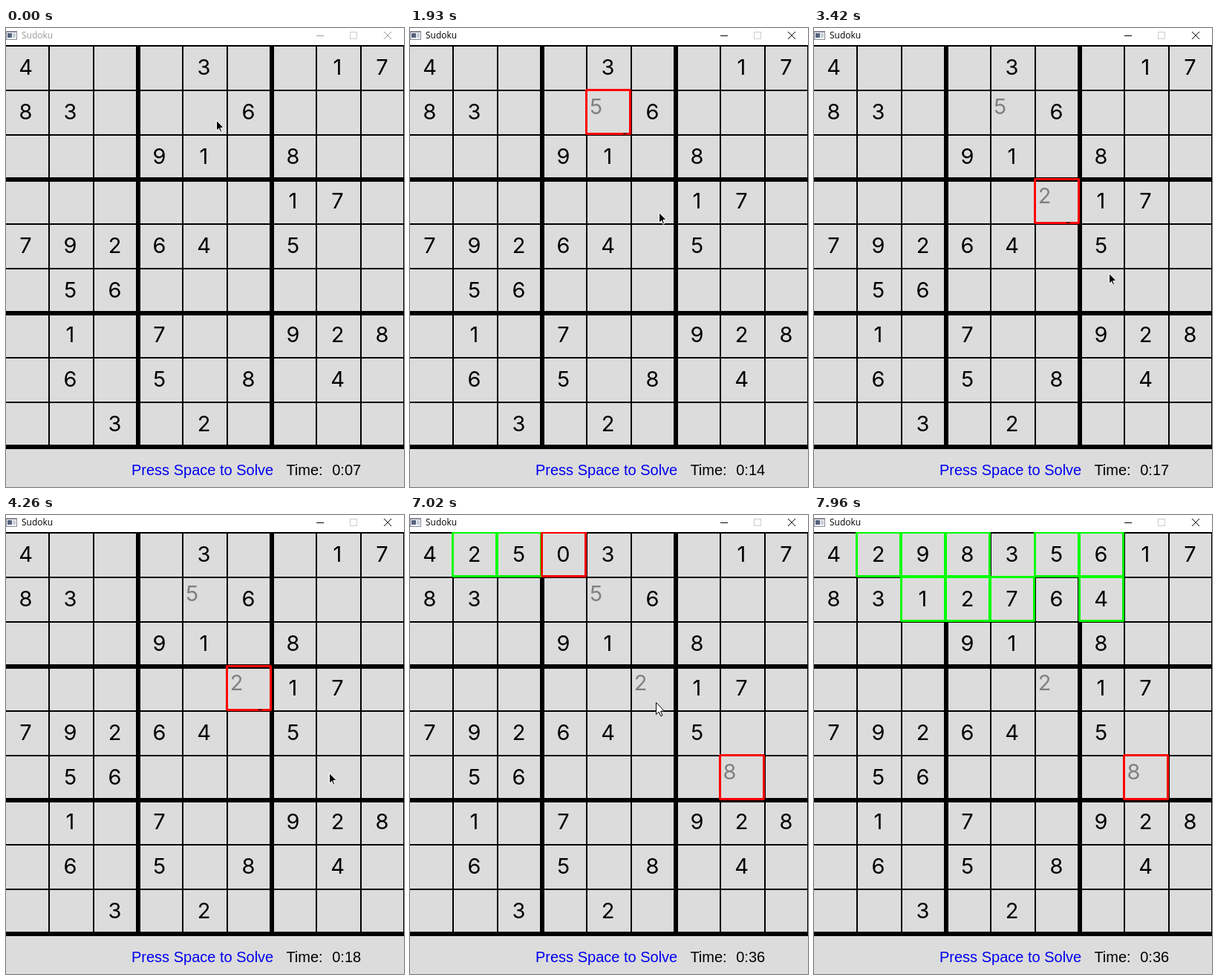
Animation, 536 px wide and 618 px high, one loop 8000 ms. Source, as an HTML page with a canvas:

```html
<!DOCTYPE html>
<html lang="en">
<head>
<meta charset="utf-8">
<title>Sudoku</title>
<style>
html, body { margin: 0; width: 100%; height: 100%; overflow: hidden; background: #dcdcdc; }
canvas { display: block; }
</style>
</head>
<body>
<canvas id="stage" width="536" height="618"></canvas>
<script>
const ctx = document.getElementById('stage').getContext('2d');
const LOOP = 8000, TICK = 78, CELL = 60, LEFT = -3, TOP = 23;
const SOLVE_START = 6710, SOLVE_STEP = 103;
const DIGIT_FONT = '29px Inter, "Liberation Sans", sans-serif';
const LABEL_FONT = '20px "Liberation Sans", Arial, sans-serif';
const TITLE_FONT = '12px "Open Sans", "Noto Sans", sans-serif';
const BACK = '#dcdcdc', RED = '#f00', GREEN = '#0f0';

const puzzle = [
  '4...3..17',
  '83...6...',
  '...91.8..',
  '......17.',
  '79264.5..',
  '.56......',
  '.1.7..928',
  '.6.5.8.4.',
  '..3.2....'
].map(line => [...line].map(char => Number(char) || 0));

// Cells picked by the player, with the notes typed as [time, digit].
const picks = [
  { at: 230, row: 1, col: 4, notes: [[930, 5]] },
  { at: 2090, row: 3, col: 5, notes: [[2720, 2]] },
  { at: 4660, row: 5, col: 7, notes: [[5270, 4], [5750, 8]] }
];

// Pointer moves: each runs from the end of the one before.
const moves = [
  { start: 0, end: 160, x: 282, y: 128 },
  { start: 1490, end: 1930, x: 335, y: 248 },
  { start: 2872, end: 3730, x: 407, y: 342 },
  { start: 3730, end: 4260, x: 435, y: 347 },
  { start: 4352, end: 4580, x: 437, y: 374 }
];

const cellX = col => LEFT + col * CELL;
const cellY = row => TOP + row * CELL;
const mix = (a, b, p) => a + (b - a) * p;
const easeOut = p => 1 - (1 - p) ** 2;
const latest = (list, t) => list.filter(([at]) => at <= t).pop();

// Progress from 0 to 1 in discrete ticks.
function progress(start, end, t) {
  const ticks = Math.round((end - start) / TICK);
  const part = Math.min(1, Math.max(0, (t - start) / (end - start)));
  return Math.floor(part * ticks) / ticks;
}

function fits(board, row, col, digit) {
  for (let i = 0; i < 9; i++) {
    const boxRow = row - row % 3 + Math.floor(i / 3);
    const boxCol = col - col % 3 + i % 3;
    if ([board[row][i], board[i][col], board[boxRow][boxCol]].includes(digit)) return false;
  }
  return true;
}

// Backtracking that reports every digit set and every cell cleared.
function* solve(board) {
  const row = board.findIndex(line => line.includes(0));
  if (row < 0) return true;
  const col = board[row].indexOf(0);
  for (let digit = 1; digit <= 9; digit++) {
    if (!fits(board, row, col, digit)) continue;
    board[row][col] = digit;
    yield { row, col, digit };
    if (yield* solve(board)) return true;
    board[row][col] = 0;
    yield { row, col, digit: 0 };
  }
  return false;
}

const solver = solve(puzzle.map(line => [...line]));
const steps = Array.from(
  { length: Math.ceil((LOOP - SOLVE_START) / SOLVE_STEP) },
  () => solver.next().value
);

// The clock runs unevenly, then skips ahead while the window is inactive.
function secondsAt(t) {
  const keys = [[0, 7.6], [480, 11.2], [1930, 14.1], [4890, 20], [5580, 23.1]];
  const skip = t >= 6310 ? 13 : 0;
  const next = keys.findIndex(([at]) => at > t);
  if (next < 0) return 23 + skip;
  const [t0, s0] = keys[next - 1], [t1, s1] = keys[next];
  return Math.floor(mix(s0, s1, (t - t0) / (t1 - t0)));
}

function pointerAt(t) {
  let x = 283, y = 124;
  for (const move of moves) {
    const p = easeOut(progress(move.start, move.end, t));
    x = mix(x, move.x, p);
    y = mix(y, move.y, p);
  }
  return [Math.round(x), Math.round(y)];
}

function fill(color, x, y, w, h) {
  ctx.fillStyle = color;
  ctx.fillRect(x, y, w, h);
}

function write(text, x, y, font, color, align = 'left') {
  ctx.font = font;
  ctx.fillStyle = color;
  ctx.textAlign = align;
  ctx.fillText(text, x, y);
}

function drawTitleBar(active) {
  const ink = active ? '#000' : '#999';
  fill('#fff', 0, 0, 536, TOP);
  fill('#868b96', 0, 4, 15, 12);
  fill('#f4f6fa', 1, 6, 13, 9);
  fill('#56637d', 2, 7, 6, 6);
  fill('#c8ced8', 9, 7, 4, 6);
  write('Sudoku', 21, 14, TITLE_FONT, ink);
  fill(ink, 418, 10, 10, 1);
  ctx.lineWidth = 1;
  ctx.strokeStyle = '#ccc';
  ctx.strokeRect(463.5, 5.5, 9, 9);
  ctx.strokeStyle = ink;
  ctx.beginPath();
  ctx.moveTo(509, 5);
  ctx.lineTo(519, 15);
  ctx.moveTo(519, 5);
  ctx.lineTo(509, 15);
  ctx.stroke();
}

function drawGrid() {
  for (let i = 0; i <= 9; i++) {
    const thick = i > 0 && i % 3 === 0;
    const width = thick ? 6 : 2, shift = thick ? 2 : 0;
    fill('#000', 0, cellY(i) - shift, 537, width);
    fill('#000', cellX(i) - shift, TOP, width, 9 * CELL);
  }
}

function drawDigit(digit, row, col) {
  write(digit, cellX(col) + 29.5, cellY(row) + 40, DIGIT_FONT, '#000', 'center');
}

function drawNote(digit, row, col) {
  write(digit, cellX(col) + 13.5, cellY(row) + 33, DIGIT_FONT, '#808080', 'center');
}

// Four bars that leave the outermost corner pixels open.
function drawFrame(row, col, color) {
  const x = cellX(col), y = cellY(row);
  for (const side of [-1, CELL - 2]) {
    fill(color, x + side, y, 3, CELL);
    fill(color, x, y + side, CELL, 3);
  }
}

function drawPicks(t) {
  const made = picks.filter(pick => pick.at <= t);
  for (const { row, col, notes } of made) {
    const note = latest(notes, t);
    if (note) drawNote(note[1], row, col);
  }
  if (!made.length) return;
  const { at, row, col } = made.pop();
  drawFrame(row, col, RED);
  // the pointer leaves a dark trace on the frame
  const [x, y] = pointerAt(at);
  const room = cellY(row + 1) - y - 12;
  fill('#700000', x + 5, y + 13, 5, Math.max(0, Math.min(2, room)));
}

function drawStep({ row, col, digit }) {
  fill(BACK, cellX(col), cellY(row), CELL, CELL);
  drawDigit(digit, row, col);
  drawFrame(row, col, digit ? GREEN : RED);
}

function drawFooter(t) {
  const seconds = String(secondsAt(t)).padStart(2, '0');
  write('Press Space to Solve', 169, 602, LABEL_FONT, '#0000f0');
  write('Time:', 377.4, 602, LABEL_FONT, '#000');
  write('0:' + seconds, 439.2, 602, LABEL_FONT, '#000');
}

function drawArrow([x, y], scale, color, outline) {
  const corners = [[0, 0], [0, 16], [3.7, 12.6], [6.2, 18.2], [8.4, 17.3], [6.1, 11.7], [11, 11.4]];
  ctx.beginPath();
  for (const [dx, dy] of corners) ctx.lineTo(x + 0.5 + dx * scale, y + 0.5 + dy * scale);
  ctx.closePath();
  ctx.lineWidth = 1;
  ctx.strokeStyle = outline;
  ctx.fillStyle = color;
  ctx.fill();
  ctx.stroke();
}

function drawPointers(t) {
  if (t < 6150) drawArrow(pointerAt(t), 0.86, '#000', '#fff');
  if (t >= 6800 && t < 7240) {
    const p = progress(6800, 7240, t);
    drawArrow([mix(426, 236, p), mix(594, -90, p)], 1, '#fff', '#000');
  }
}

function draw(t) {
  fill(BACK, 0, 0, 536, 618);
  drawTitleBar(t >= 150 && !(t >= 6230 && t < 6390));
  ctx.save();
  ctx.beginPath();
  ctx.rect(0, TOP, 536, 618 - TOP);
  ctx.clip();
  drawGrid();
  puzzle.forEach((line, row) => line.forEach((digit, col) => {
    if (digit) drawDigit(digit, row, col);
  }));
  drawPicks(t);
  const done = Math.floor((t - SOLVE_START) / SOLVE_STEP) + 1;
  steps.slice(0, Math.max(0, done)).forEach(drawStep);
  drawFooter(t);
  ctx.restore();
  drawPointers(t);
}

const begin = performance.now();
function tick() {
  draw((performance.now() - begin) % LOOP);
  requestAnimationFrame(tick);
}
tick();
</script>
</body>
</html>
```
